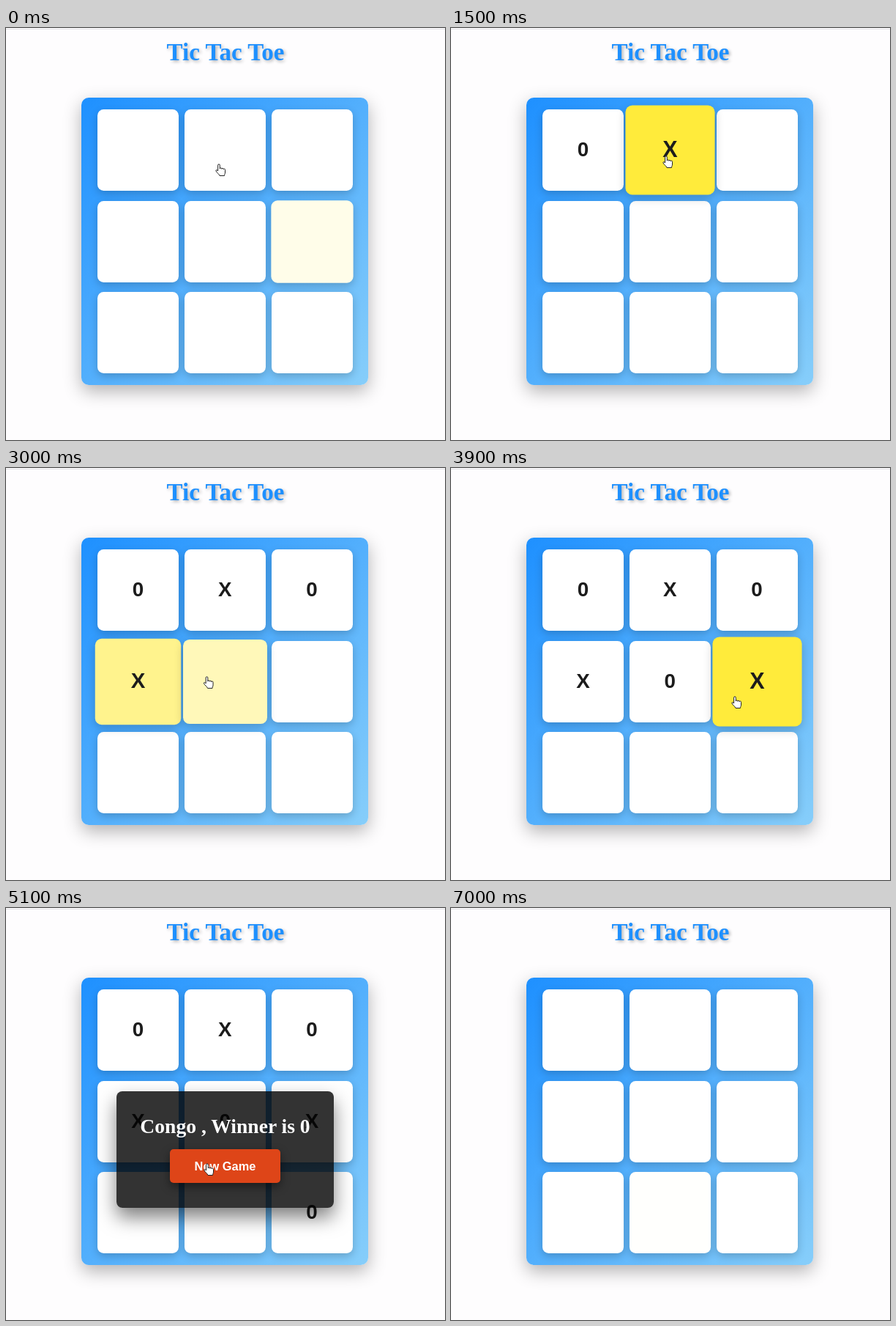
An HTML page that plays this animation: 600x562 px, repeating every 7.2 s.

```html
<!DOCTYPE html>
<html lang="en">
<head>
<meta charset="utf-8">
<title>Tic Tac Toe</title>
<style>
html, body { margin: 0; width: 100%; height: 100%; overflow: hidden; background: #fefdfe; }
#stage { position: relative; width: 600px; height: 562px; overflow: hidden; }
#stage div, #stage svg { position: absolute; box-sizing: border-box; }
#rule { left: 0; top: 1px; width: 600px; height: 1px; background: #e4e3e8; }
.serif { font-family: "Liberation Serif", "Times New Roman", serif; font-weight: bold; text-align: center; white-space: nowrap; }
.sans { font-family: "Liberation Sans", Arial, sans-serif; font-weight: bold; text-align: center; white-space: nowrap; }
#title { left: 0; top: 12.5px; width: 600px; font-size: 33px; line-height: 40px; color: #1e90ff; text-shadow: 2px 2px 4px rgba(0,0,0,.3); }
#board { left: 102.7px; top: 94.7px; width: 392.7px; height: 392.3px; border-radius: 10px;
  background: linear-gradient(135deg, #1e90ff, #87cefa); box-shadow: 0 8.5px 25px rgba(0,0,0,.3); }
.cell { width: 111px; height: 111px; border-radius: 8.5px; font-size: 27.8px; line-height: 110px; color: #1c1c1c;
  box-shadow: 0 4px 12px rgba(0,0,0,.2); }
#popup { left: 151px; top: 249.7px; width: 297px; height: 159.5px; border-radius: 8px; color: #fff; z-index: 2;
  background: rgba(0,0,0,.8); box-shadow: 0 13px 26px rgba(0,0,0,.5); }
#message { left: 0; top: 32.5px; width: 297px; font-size: 27.6px; line-height: 32px; }
#button { left: 73px; top: 79px; width: 151px; height: 46px; border-radius: 5px; font-size: 16.4px; line-height: 46px;
  box-shadow: 0 5px 13px rgba(0,0,0,.45); }
#cursor { left: 0; top: 0; overflow: visible; z-index: 3; }
</style>
</head>
<body>
<div id="stage">
  <div id="rule"></div>
  <div id="title" class="serif">Tic Tac Toe</div>
  <div id="board"></div>
  <div id="popup">
    <div id="message" class="serif">Congo , Winner is 0</div>
    <div id="button" class="sans">New Game</div>
  </div>
  <svg id="cursor" width="1" height="1">
    <path fill="#fff" stroke="#222" stroke-linejoin="round"
      d="M-1.4 9V1.2a1.35 1.35 0 0 1 2.7 0V6a1.2 1.2 0 0 1 2.5.3a1.2 1.2 0 0 1 2.4.5a1.2 1.2 0 0 1 2.3.6V11c0 2-1 2.5-1 4.5H1C.4 13.2-3 11.5-4 9c-.6-1.6 1.2-2 2.6 0z"/>
  </svg>
</div>
<script>
const LOOP = 7200, STEP = 100, LAST = 7000, RESET = 6500;
const BEAT = 633, FADE = 300, GLIDE = 333;
const $ = id => document.getElementById(id);
const clickTime = turn => 700 + BEAT * turn;

const order = [0, 1, 2, 3, 4, 5, 8];
const WIN = clickTime(order.length - 1);

// Where the fingertip rests: start, one stop per turn, button, off stage
const stops = [
  [291, 186], [222, 173], [294, 175], [366, 172], [204, 281],
  [312, 287], [388, 312], [390, 400], [275, 349], [290, 590]
];

// The pointer is over a cell from just before its click until just after
const visits = order.map((cell, turn) => ({
  cell, enter: clickTime(turn) - 300, leave: Math.min(clickTime(turn) + 325, WIN)
}));
visits.push(
  { cell: 5, enter: -600, leave: -180 },
  { cell: 1, enter: 0, leave: 390 },
  { cell: 7, enter: RESET + 150, leave: RESET + 250 }
);

const cells = Array.from({ length: 9 }, (_, i) => {
  const cell = document.createElement("div");
  cell.className = "cell sans";
  cell.style.left = 125 + i % 3 * 118.75 + "px";
  cell.style.top = 111 + Math.floor(i / 3) * 124.5 + "px";
  $("stage").insertBefore(cell, $("popup"));
  return cell;
});

const clamp = v => Math.min(1, Math.max(0, v));
const mix = (a, b, k) => a.map((v, i) => v + (b[i] - v) * k);
const bezier = (u, a, b) => 3 * u * (1 - u) ** 2 * a + 3 * u * u * (1 - u) * b + u ** 3;

// The CSS "ease" curve
function ease(x) {
  let lo = 0, hi = 1;
  for (let i = 0; i < 20; i++) {
    const mid = (lo + hi) / 2;
    if (bezier(mid, .25, .25) < x) lo = mid; else hi = mid;
  }
  return bezier(lo, .1, 1);
}

const ramp = (t, start) => t <= start ? 0 : ease(clamp((t - start) / FADE));

const hoverLevel = (i, t) => Math.max(0, ...visits
  .filter(v => v.cell === i)
  .map(v => ramp(Math.min(t, v.leave), v.enter) * (1 - ramp(t, v.leave))));

function pointer(t) {
  return stops.reduce((from, to, i) => {
    const start = i === stops.length - 1 ? RESET + 100 : clickTime(i - 2) + 200;
    const k = clamp((t - start) / GLIDE);
    return mix(from, to, k * k * (3 - 2 * k));
  });
}

function draw(t) {
  cells.forEach((cell, i) => {
    const level = hoverLevel(i, t), raised = level > .002;
    const turn = order.indexOf(i);
    const marked = turn >= 0 && t >= clickTime(turn) && t < RESET;
    cell.textContent = marked ? "0X"[turn % 2] : "";
    cell.style.background = `rgb(${mix([255, 255, 255], [255, 235, 59], level)})`;
    cell.style.transform = raised ? `scale(${1 + level / 10})` : "none";
    cell.style.zIndex = raised ? 1 : 0;
  });
  $("popup").style.display = t >= WIN && t < RESET ? "block" : "none";
  $("button").style.background = `rgb(${mix([250, 84, 32], [222, 69, 24], ramp(t, WIN + 300))})`;
  const [x, y] = pointer(t);
  $("cursor").style.transform = `translate(${x}px, ${y}px)`;
}

function tick() {
  const t = performance.now() % LOOP;
  draw(Math.min(LAST, Math.floor(t / STEP) * STEP));
  requestAnimationFrame(tick);
}
tick();
</script>
</body>
</html>
```
